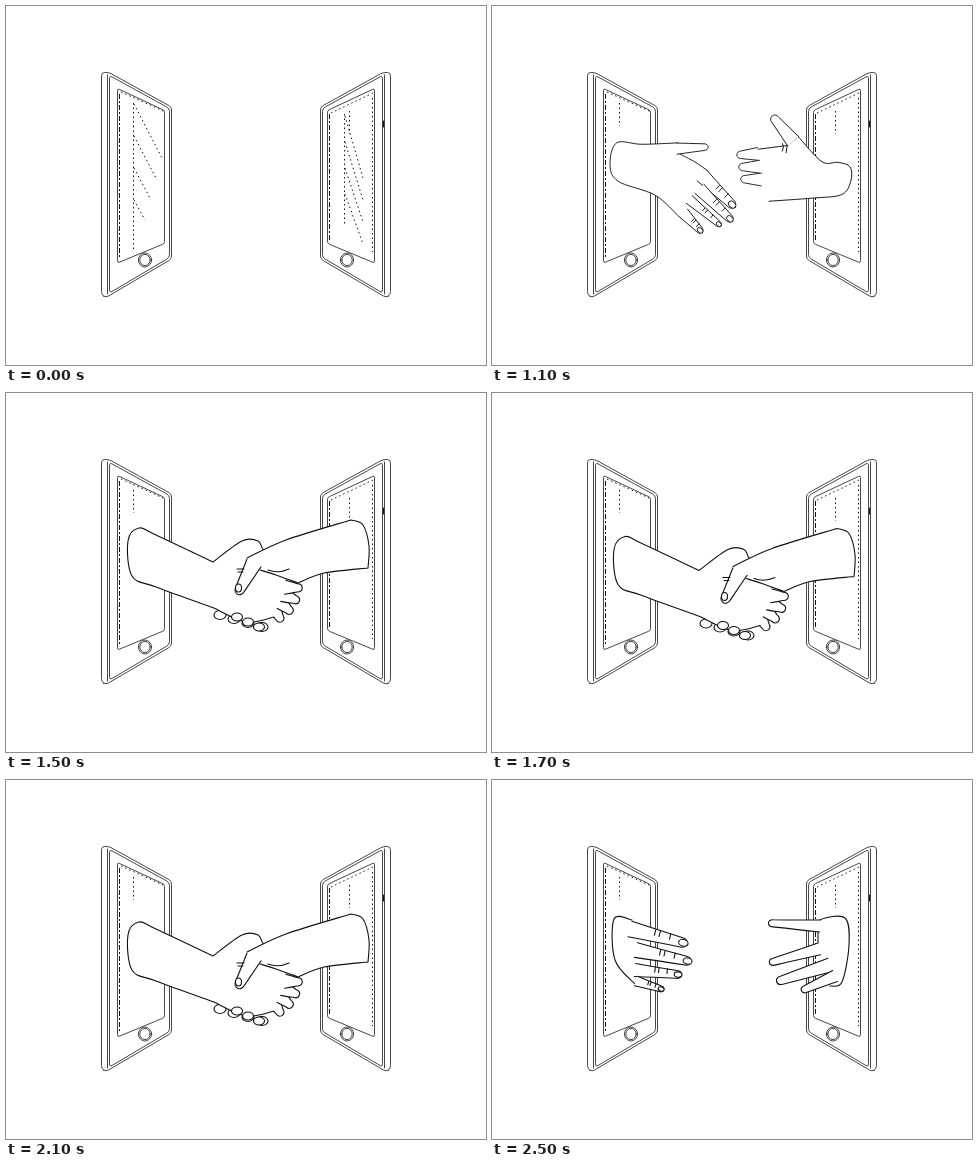
Recreate the animation shown at these times as an HTML page. Size 480 by 359 pixels, loop 2.6 s.

```html
<!DOCTYPE html>
<html lang="en">
<head>
<meta charset="utf-8">
<title>Handshake between two phones</title>
<style>
  html, body { margin: 0; width: 100%; height: 100%; overflow: hidden; background: #fff; }
  svg { display: block; width: 100%; height: 100%; }
  path, ellipse { stroke: #111; stroke-width: 1.1; fill: #fff; stroke-linejoin: round; stroke-linecap: round; }
  .phone * { stroke: #333; stroke-width: .9; }
  .line { fill: none; }
  .dots { fill: none; stroke-width: 1; stroke-linecap: butt; stroke-dasharray: 1.5 3; }
  .edge { stroke-dasharray: 5 2 2 2; }
</style>
</head>
<body>
<svg viewBox="0 0 480 359">
  <g id="phones"></g>
  <g id="glare"></g>
  <g id="left"></g>
  <g id="right"></g>
</svg>
<script>
const [phones, glare, left, right] = ['phones', 'glare', 'left', 'right'].map(id => document.getElementById(id));
const stage = left.parentNode;

const path = (d, kind = '') => `<path class="${kind}" d="${d}"/>`;
const oval = (x, y, rx, ry = rx) => `<ellipse cx="${x}" cy="${y}" rx="${rx}" ry="${ry}"/>`;
const repeat = (n, make) => Array.from({ length: n }, (_, i) => make(i)).join('');

// Polygon with rounded corners.
function rounded(points, r) {
  const n = points.length;
  const d = points.map((p, i) => {
    const [a, b] = [points[(i + n - 1) % n], points[(i + 1) % n]].map(q => {
      const k = r / Math.hypot(q[0] - p[0], q[1] - p[1]);
      return p.map((v, j) => v + (q[j] - v) * k);
    });
    return `L${a}Q${p} ${b}`;
  });
  return path('M' + d.join('').slice(1) + 'Z');
}

// Open smooth outline through "x,y" points; "/" marks a sharp corner.
function outline(text) {
  let d = '', last;
  for (const part of text.split('/')) {
    const p = part.trim().split(' ').map(s => s.split(',').map(Number));
    if (last) p.unshift(last);
    else d = 'M' + p[0];
    for (let i = 0; i < p.length - 1; i++) {
      const a = p[i], b = p[i + 1], before = p[i - 1] || a, after = p[i + 2] || b;
      const c1 = a.map((v, k) => v + (b[k] - before[k]) / 6);
      const c2 = b.map((v, k) => v - (after[k] - a[k]) / 6);
      d += `C${c1} ${c2} ${b}`;
    }
    last = p.at(-1);
  }
  return path(d);
}

// Tapered finger from its base to its tip, open at the base; w is half its width there.
function finger(x, y, tipX, tipY, w, detailed) {
  const len = Math.hypot(tipX - x, tipY - y);
  const turn = Math.atan2(tipY - y, tipX - x) * 180 / Math.PI;
  const tip = w * .6, end = len - tip * 1.4;
  let art = path(`M0 ${-w}Q${len * .4} ${-w * .8} ${end} ${-tip}C${len + 1} ${-tip} ${len + 1} ${tip} ${end} ${tip}Q${len * .4} ${w * .8} 0 ${w}`);
  if (detailed) {
    art += oval(len - tip, 0, tip, tip * .7);
    for (const k of [.42, .5, .68]) art += path(`M${len * k} ${-w * .7}v${w * .7}`, 'line');
  }
  return `<g transform="translate(${x} ${y}) rotate(${turn})">${art}</g>`;
}

const phone = rounded([[95.5, 66.5], [103, 66.5], [165.5, 101], [165.5, 253], [100, 291.5], [95.5, 289]], 3)
  + path('M101.500 69V288', 'line')
  + rounded([[103.5, 69.5], [163.5, 102.5], [163.5, 251.5], [103.5, 287]], 3)
  + rounded([[111.5, 82.5], [158.5, 104.5], [158.5, 237.5], [111.5, 257]], 2)
  + oval(139, 254, 6.6, 7) + oval(139, 254, 5.2, 5.6);
phones.innerHTML = `<g class="phone">${phone}</g>
  <g class="phone" transform="matrix(-1 0 0 1 480 0)">${phone}</g>`
  + path('M377.500 115V121', 'line')
  + path('M113.500 88V252M323.500 108V234', 'dots edge')
  + path('M115 86L157 105M325 107L367 87M366.500 92V246M127.500 97V120M343.500 105V128', 'dots');

// Reflections on the idle screens.
glare.innerHTML = path('M127.500 120V245M338.500 108V220', 'dots')
  + repeat(4, i => path(`M128 ${98 + 32 * i}l${29 - 6 * i} ${56 - 12 * i}`, 'dots'))
  + repeat(4, i => path(`M339 ${110 + 26 * i}l18 ${62 - 4 * i}`, 'dots'));

const reach = {
  left: outline('140,140 122,139 123,180 143,204')
    + finger(138, 149, 196, 164, 8, true) + finger(144, 170, 200, 182, 7.5, true)
    + finger(143, 190, 190, 195, 6.5, true) + finger(144, 201, 172, 210, 5, true),
  right: outline('326,163 326,152 / 328,140 353,138 357,165 350,202 338,206')
    + finger(328, 146, 276, 143, 6) + finger(327, 169, 277, 183, 6)
    + finger(338, 185, 284, 202, 7) + finger(343, 196, 309, 211, 6)
};

const meet = {
  left: outline('197,232 170,202 126,180 118,158 129,132 160,137 205,140 / 206,154 / 224,166 239,179')
    + finger(203, 147, 243, 149, 7) + finger(231, 184, 268, 228, 9, true)
    + finger(226, 200, 263, 245, 8, true) + finger(212, 212, 248, 249, 6, true)
    + finger(203, 228, 224, 255, 7, true),
  right: outline('222,170 271,151 / 282,137 / 318,160 338,156 354,158 359,175 352,194 318,207 266,224')
    + repeat(3, i => finger(238 + 6 * i, 170 + 15 * i, 212 + 6 * i, 178 + 14 * i, 8))
    + finger(277, 144, 243, 119, 9) + path('M265 150Q268 153 267 159M271 151L272 160', 'line')
};

const shake = {
  left: repeat(4, i => oval(214 + 14 * i, 224 + 4 * i, 6, 4.5))
    + repeat(4, i => {
      const a = .05 + .33 * (3 - i), c = Math.cos(a), s = Math.sin(a);
      return finger(255 + 24 * c, 195 + 24 * s, 255 + 42 * c, 195 + 42 * s, 7);
    })
    + outline('280,188 258,160 252,150 236,150 207,171 / 150,144 133,137 122,150 126,185 150,196 208,217 / 240,231 268,226')
    + repeat(3, i => oval(231 + 11 * i, 226 + 5 * i, 5.5, 4)),
  right: outline('241,167 280,149 345,129 / 357,134 363,155 362,177 / 318,182 292,192 / 270,184 254,179')
    + finger(248, 172, 231, 204, 8) + oval(232.5, 197, 3, 4)
    + path('M262 179Q272 183 283 178M231 178h7M232 181h5', 'line')
};

// Approaching hands: the meeting pose, drawn in towards each wrist.
const drawnIn = (art, x, y, turn) =>
  `<g transform="translate(${x} ${y}) rotate(${turn}) scale(.8) translate(${-x} ${-y})">${art}</g>`;
const near = { left: drawnIn(meet.left, 119, 160, -6), right: drawnIn(meet.right, 358, 175, 14) };

const opening = [null, reach, near, meet];
const shakeShift = [0, -2, 6.5, 2, 5];

// Pose and vertical shift at time t: idle, reach out, shake, draw back.
function poseAt(t) {
  if (t < 1000) return [null, 0];
  if (t < 1300) return [opening[Math.floor(t / 100) - 9], 0];
  if (t < 2300) return [shake, shakeShift[Math.floor((t - 1300) / 200)]];
  return [opening[Math.max(1, 26 - Math.floor(t / 100))], 0];
}

let shown;
function draw(now) {
  const [pose, dy] = poseAt(now % 2600);
  if (pose !== shown) {
    shown = pose;
    left.innerHTML = pose ? pose.left : '';
    right.innerHTML = pose ? pose.right : '';
    stage.append(pose === shake ? right : left);
    glare.style.display = pose ? 'none' : '';
  }
  for (const hand of [left, right]) hand.setAttribute('transform', `translate(0 ${dy})`);
  requestAnimationFrame(draw);
}
draw(performance.now());
</script>
</body>
</html>
```
